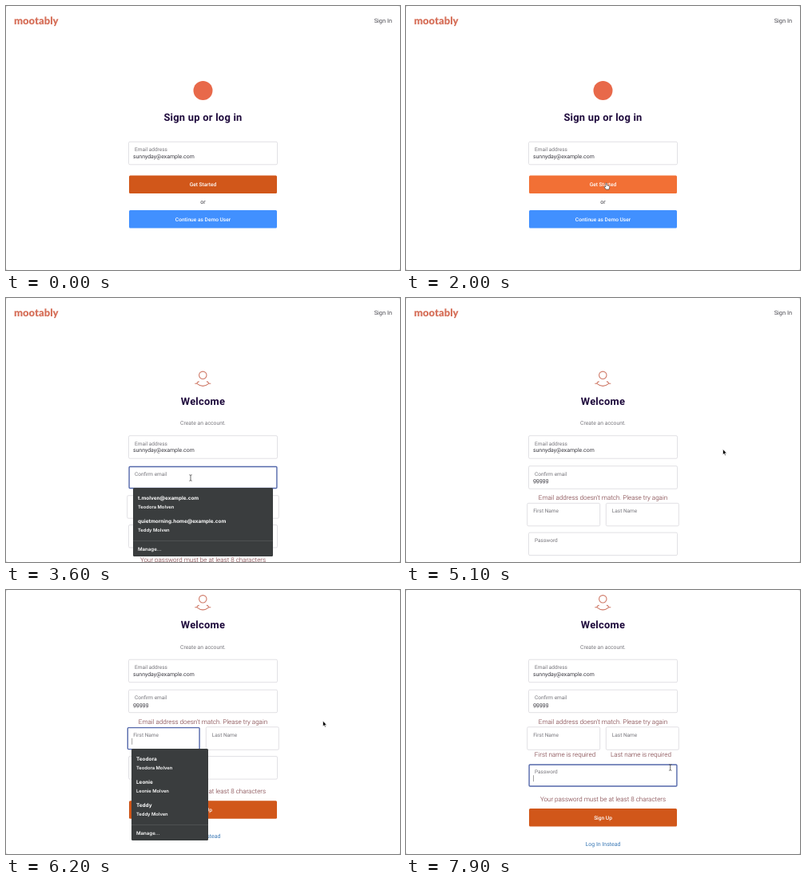
Animation of 493 by 331 pixels, one loop 8000 ms. Source, as an HTML page:

```html
<!DOCTYPE html>
<html lang="en">
<head>
<meta charset="utf-8">
<title>Sign up flow</title>
<style>
  html, body { margin: 0; width: 100%; height: 100%; overflow: hidden; background: #dcdcdc; }
  svg { display: block; width: 493px; height: 331px; background: #fff; border-radius: 3px; }
  text { font-family: Roboto, sans-serif; white-space: pre; text-rendering: geometricPrecision; }
  .brand { font-family: Lato, sans-serif; font-weight: 900; fill: #d6705a; }
  .title { font-weight: 700; letter-spacing: .25px; fill: #1e0a3c; }
  .label { fill: #77767c; }
  .value { fill: #3b3a42; }
  .nav { fill: #4c4b52; }
  .button { font-weight: 500; fill: #fff; }
  .error { font-weight: 300; fill: #6f2a30; }
  .link { fill: #3a78b5; }
  .menu { font-family: Inter, sans-serif; font-weight: 600; fill: #fff; }
  .strong { font-weight: 700; }
</style>
</head>
<body>
<svg id="stage" viewBox="0 0 493 331"></svg>
<script>
const LOOP = 8000, SCROLL = 85.5, ERROR_HEIGHT = 9.6;
const ORANGE = '#d1571a', ORANGE_HOVER = '#f27035';
const stage = document.getElementById('stage');

function add(parent, tag, attrs = {}, content = '') {
  const el = document.createElementNS('http://www.w3.org/2000/svg', tag);
  for (const key in attrs) el.setAttribute(key, attrs[key]);
  el.textContent = content;
  return parent.appendChild(el);
}
const group = parent => add(parent, 'g');
const show = (el, on) => el.setAttribute('visibility', on ? 'inherit' : 'hidden');
const move = (el, x, y) => el.setAttribute('transform', `translate(${x} ${y})`);

// y is the middle of the capitals
function label(parent, x, y, size, cls, content, anchor = 'start') {
  return add(parent, 'text', {
    x, y: y + size * 0.36, 'font-size': size, class: cls, 'text-anchor': anchor
  }, content);
}
const centered = (parent, y, size, cls, content, x = 246.5) =>
  label(parent, x, y, size, cls, content, 'middle');

function button(parent, y, color, content) {
  const rect = add(parent, 'rect', { x: 154, y, width: 185, height: 22.5, rx: 1.5, fill: color });
  centered(parent, y + 11.3, 6.6, 'button', content);
  return rect;
}

function field(parent, x, y, width, name, content = '') {
  const box = add(parent, 'rect', { x, y, width, height: 28.5, rx: 1.5, fill: '#fff', stroke: '#e1e0e4' });
  const ring = add(parent, 'rect', {
    x: x + 0.6, y: y + 0.8, width: width - 1.2, height: 27, rx: 1,
    fill: 'none', stroke: '#5468ab', 'stroke-width': 1.4
  });
  label(parent, x + 7.5, y + 9.8, 6.5, 'label', name);
  const value = label(parent, x + 5.5, y + 18.2, 6.9, 'value', content);
  const caret = add(parent, 'rect', { y: y + 14, width: 0.6, height: 8, fill: '#666' });
  return {
    value,
    update(focused, age = 0) {
      show(box, !focused);
      show(ring, focused);
      caret.setAttribute('x', x + 5.8 + value.textContent.length * 3.9);
      show(caret, focused && age % 1000 < 500);
    }
  };
}

function menu(parent, x, y, width, rows) {
  const g = group(parent), end = rows.length * 29;
  add(g, 'rect', { x, y, width, height: end + 28, rx: 1.5, fill: '#3a3d3e' });
  rows.forEach(([main, sub], i) => {
    label(g, x + 6, y + 13 + i * 29, 6.4, 'menu strong', main);
    label(g, x + 6, y + 24 + i * 29, 5.8, 'menu', sub);
  });
  add(g, 'rect', { x, y: y + end + 8, width, height: 0.6, fill: '#5c5f60' });
  label(g, x + 6, y + end + 18.5, 6.1, 'menu', 'Manage...');
  return g;
}

// Page content
const page = group(stage);
label(page, 10, 18.5, 13, 'brand', 'mootably');
label(page, 483, 18.5, 7.4, 'nav', 'Sign In', 'end');

const login = group(page);
add(login, 'circle', { cx: 246.5, cy: 106, r: 12, fill: '#e8694a' });
centered(login, 139.5, 12.9, 'title', 'Sign up or log in');
field(login, 153.5, 170.3, 186, 'Email address', 'sunnyday@example.com').update(false);
const getStarted = button(login, 212.4, ORANGE, 'Get Started');
centered(login, 245.5, 7, 'value', 'or');
button(login, 256, '#4190ff', 'Continue as Demo User');

const signup = group(page);
const icon = add(signup, 'g', { fill: 'none', stroke: '#cf7a68', 'stroke-width': 1.1 });
add(icon, 'circle', { cx: 246.3, cy: 96.8, r: 4.7 });
add(icon, 'path', {
  d: 'M236.3 107.2H238.6Q239.6 105.2 241.6 104.6M251 104.6Q253 105.2 254 107.2H256.3M238.6 107.2Q246.3 113.6 254 107.2'
});
centered(signup, 129.3, 12.9, 'title', 'Welcome');
centered(signup, 157, 6.8, 'label', 'Create an account.');
field(signup, 153.5, 172.7, 186, 'Email address', 'sunnyday@example.com').update(false);
const confirmEmail = field(signup, 153.5, 210.7, 186, 'Confirm email');
const emailError = centered(signup, 250.5, 8.05, 'error', "Email address doesn't match. Please try again");

const lower = group(signup);
const password = field(lower, 153.5, 284.5, 186, 'Password');
centered(lower, 328.5, 8.05, 'error', 'Your password must be at least 8 characters');
button(lower, 340.2, ORANGE, 'Sign Up');
centered(lower, 384.4, 7, 'link', 'Log In Instead');

const names = group(signup);
const firstName = field(names, 151.7, 247.7, 91, 'First Name');
const lastName = field(names, 250.3, 247.7, 91, 'Last Name');
const firstError = centered(names, 282.5, 8.05, 'error', 'First name is required', 199);
const lastError = centered(names, 282.5, 8.05, 'error', 'Last name is required', 294);
const firstMenu = menu(names, 157, 274.9, 96, [
  ['Teodora', 'Teodora Molven'], ['Leonie', 'Leonie Molven'], ['Teddy', 'Teddy Molven']]);
const lastMenu = menu(names, 255.8, 274.9, 96, [
  ['Molven', 'Teodora Molven'], ['Molven', 'Leonie Molven']]);
const emailMenu = menu(signup, 159, 238, 175, [
  ['t.molven@example.com', 'Teodora Molven'],
  ['quietmorning.home@example.com', 'Teddy Molven']]);

const scrollbar = add(stage, 'rect', { x: 488.5, width: 3.5, height: 264, rx: 1.7, fill: '#858585' });

// Pointer shapes, each with its hot spot at the origin
const outline = { stroke: '#fff', 'stroke-width': 0.6, 'stroke-linejoin': 'round' };
const pointers = { arrow: group(stage), beam: group(stage), hand: group(stage) };
add(pointers.arrow, 'path', { d: 'M0 0V7L1.6 5.6L2.6 8L3.7 7.5L2.7 5.2H4.8Z', fill: '#000', ...outline });
add(pointers.beam, 'path', {
  d: 'M-1.6 -3.8Q0 -3.8 0 -2.8Q0 -3.8 1.6 -3.8M0 -2.8V2.8M-1.6 3.8Q0 3.8 0 2.8Q0 3.8 1.6 3.8',
  fill: 'none', stroke: '#444', 'stroke-width': 0.8
});
add(pointers.hand, 'path', {
  d: 'M-1 -4Q0 -4.6 .3 -3.5V-1.2L3 -.6Q4 -.3 3.8 1L3 4H-.8L-3 .8Q-3.2 -.2 -2.2 0L-1.2 1Z',
  fill: '#fff', stroke: '#333', 'stroke-width': 0.6
});

// time, x, y, shape from that time on
const track = [
  [0, 236, 192, ''], [1000, 236, 192, 'beam'], [1400, 251, 226, 'hand'],
  [2200, 251, 226, 'beam'], [2500, 251, 226, 'beam'], [2800, 231, 225.5, 'beam'],
  [3900, 231, 225.5, ''], [4300, 231, 225.5, 'beam'], [4600, 396.5, 189.5, 'arrow'],
  [4700, 396.5, 189.5, 'arrow'], [4800, 403, 191, 'arrow'], [4900, 396.5, 189.5, 'arrow'],
  [5120, 396.5, 189.5, 'arrow'], [5450, 304, 185.5, 'beam'], [5550, 304, 185.5, 'beam'],
  [5780, 200, 186, 'beam'], [5900, 200, 186, 'arrow'], [6150, 396.5, 164, 'arrow'],
  [6400, 396.5, 164, 'arrow'], [6650, 300, 186, 'beam'], [6720, 300, 186, 'arrow'],
  [6880, 389, 168, 'arrow'], [7150, 389, 168, 'arrow'], [7450, 330.7, 222.5, 'beam'],
  [LOOP, 330.7, 222.5, 'beam']
];

const within = (t, from, to) => t >= from && t < to;
const progress = (t, from, to) => Math.min(1, Math.max(0, (t - from) / (to - from)));
const ease = p => p * p * (3 - 2 * p);

function drawPointer(t) {
  const i = track.findIndex(key => key[0] > t) - 1;
  const [t0, x0, y0, shape] = track[i], [t1, x1, y1] = track[i + 1];
  const p = ease(progress(t, t0, t1));
  const x = x0 + (x1 - x0) * p, y = y0 + (y1 - y0) * p;
  for (const name in pointers) {
    show(pointers[name], name === shape);
    move(pointers[name], x, y);
  }
  getStarted.setAttribute('fill', shape && y > 212 ? ORANGE_HOVER : ORANGE);
}

function draw(t) {
  const signedUp = t >= 2200;
  show(login, !signedUp);
  show(signup, signedUp);
  drawPointer(t);

  const typed = Math.min(5, Math.max(0, Math.floor((t - 3900) / 80) + 1));
  confirmEmail.value.textContent = 'g'.repeat(typed);
  confirmEmail.update(within(t, 3000, 4650), t - 3000);
  firstName.update(within(t, 5800, 6350), t - 5800);
  lastName.update(within(t, 6700, 7100), t - 6700);
  password.update(t >= 7500, t - 7500);

  show(emailMenu, within(t, 3050, 3900));
  show(firstMenu, within(t, 5850, 6350));
  show(lastMenu, within(t, 6750, 7100));

  const emailWrong = t >= 4650, firstMissing = t >= 6350;
  show(emailError, emailWrong);
  show(firstError, firstMissing);
  show(lastError, t >= 7100);
  move(names, 0, emailWrong * ERROR_HEIGHT);
  move(lower, 0, (emailWrong + firstMissing) * ERROR_HEIGHT);

  const scrolled = ease(progress(t, 5130, 5450));
  move(page, 0, -SCROLL * scrolled);
  scrollbar.setAttribute('y', 67 * scrolled);
  scrollbar.setAttribute('opacity', t < 5130 ? 0 : 1 - progress(t, 5950, 6150));
}

function frame(now) {
  draw(now % LOOP);
  requestAnimationFrame(frame);
}
draw(0);
requestAnimationFrame(frame);
</script>
</body>
</html>
```
